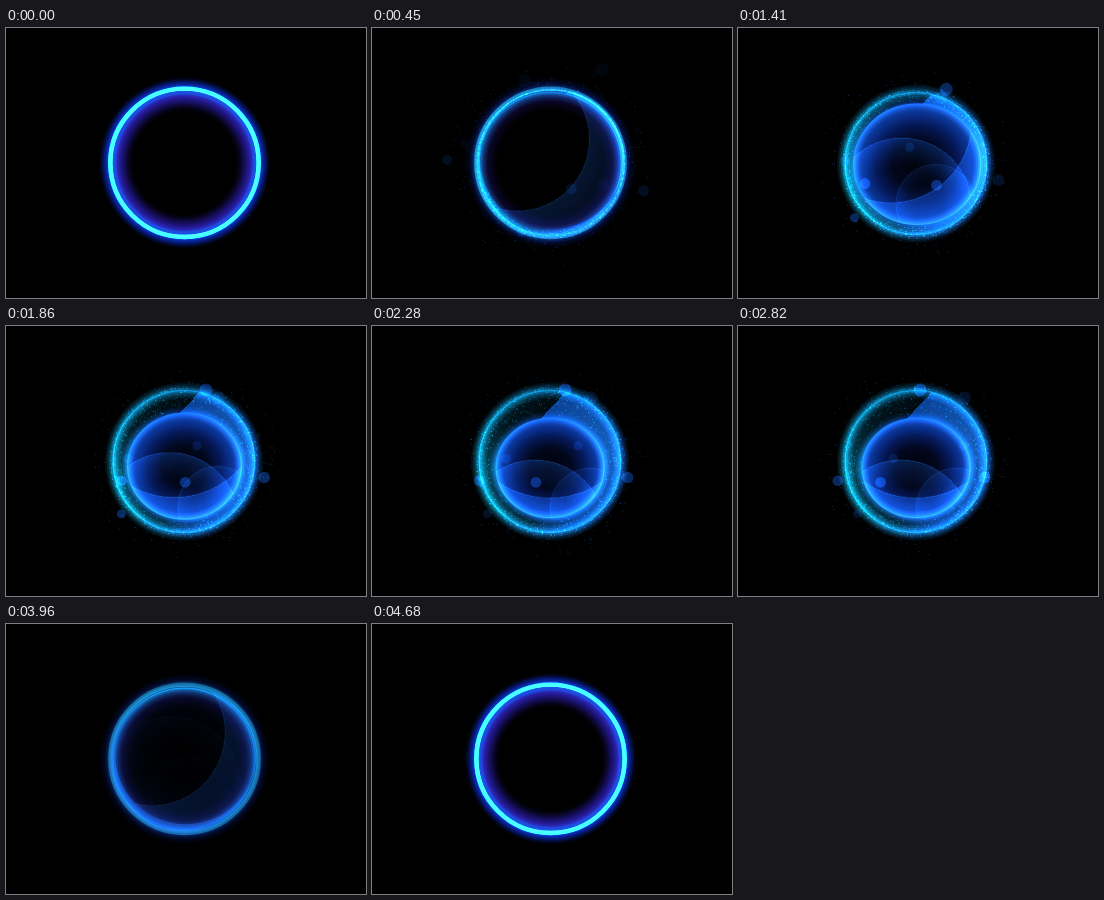
Recreate the animation shown at these times as an HTML page with a canvas. Size 360 by 270 pixels, loop 4.71 s.

```html
<!DOCTYPE html>
<html lang="en">
<head>
<meta charset="utf-8">
<title>Energy orb</title>
<style>
  html, body { margin: 0; width: 100%; height: 100%; overflow: hidden; background: #000; }
  canvas { display: block; width: 360px; height: 270px; }
</style>
</head>
<body>
<canvas id="stage" width="360" height="270"></canvas>
<script>
const ctx = document.getElementById('stage').getContext('2d');
const LOOP = 4.71, TAU = Math.PI * 2, DEG = TAU / 360;
const CX = 178, CY = 135.5, RIM = 71;

let seed = 11;
const random = () => (seed = seed * 16807 % 2147483647) / 2147483647;
const makeDots = count => Array.from({ length: count }, () =>
  ({ angle: random() * TAU, depth: random(), light: random(), phase: random() * TAU }));
const grains = makeDots(1300), dust = makeDots(500), discs = makeDots(8);

const mix = (a, b, u) => a + (b - a) * u;
const smooth = (a, b, t) => {
  const x = Math.min(1, Math.max(0, (t - a) / (b - a)));
  return x * x * (3 - 2 * x);
};
// Rises over [a, b] and falls over [c, d]
const pulse = (a, b, c, d, t) => smooth(a, b, t) * (1 - smooth(c, d, t));

function paint(gradient, ...stops) {
  stops.forEach(([at, color]) => gradient.addColorStop(at, color));
  return gradient;
}

function ellipse({ x, y, rx, ry }) {
  ctx.beginPath();
  ctx.ellipse(x, y, rx, ry, 0, 0, TAU);
}

// Soft line: the same outline stroked ever wider and fainter
function glow(shape, style, alpha, layers) {
  ellipse(shape);
  ctx.strokeStyle = style;
  for (let i = 0; i < layers; i++) {
    ctx.globalAlpha = alpha * .42 / (1 + i * .75);
    ctx.lineWidth = 1.5 + 3.6 * i;
    ctx.stroke();
  }
}

function drawNeon(alpha) {
  const x = 178.5, y = 134.8, outer = 87;
  ctx.globalAlpha = alpha;
  ctx.fillStyle = paint(ctx.createRadialGradient(x, y, 0, x, y, outer),
    [.575, '#0000'], [.655, '#0b0730'], [.736, '#22178a'], [.776, '#2a28b8'], [.787, '#1f45d8'],
    [.83, '#1c58e8'], [.88, '#0c38c8'], [.91, '#06208c'], [.943, '#030f48'], [1, '#0000']);
  ctx.fillRect(0, 0, 360, 270);
  ctx.strokeStyle = '#35eeff';
  ctx.lineWidth = 4.4;
  ctx.beginPath();
  ctx.arc(x, y, 74.2, 0, TAU);
  ctx.stroke();
}

// Area between rim and sphere: a blue crescent with a hard slanted edge, teal elsewhere
function drawBand(sphere, orb, turn) {
  const hub = turn + 190 * DEG;
  ctx.globalAlpha = orb * .8;
  ctx.fillStyle = paint(
    ctx.createConicGradient(turn - 47 * DEG, CX + 43 * Math.cos(hub), CY + 43 * Math.sin(hub)),
    [0, '#0c50b8'], [.13, '#1c78f0'], [.26, '#0c50b8'], [.33, '#02222e'],
    [.5, '#05546c'], [.7, '#04384c'], [.85, '#02222e'], [1, '#010c12']);
  ellipse(sphere);
  ctx.arc(CX, CY, RIM, 0, TAU);
  ctx.fill('evenodd');

  const rim = paint(ctx.createConicGradient(turn, CX, CY),
    [0, '#1c78ff'], [.25, '#1c90f8'], [.38, '#14c0f0'], [.55, '#10a8d8'], [.75, '#0c80c0'], [1, '#1c78ff']);
  glow({ x: CX, y: CY, rx: RIM, ry: RIM }, rim, orb, 5);
}

function drawSphere(sphere, orb, light) {
  const { x, y, rx, ry } = sphere;
  ctx.save();
  ctx.translate(x, y);
  ctx.scale(rx, ry);
  ctx.globalAlpha = orb * light * .9;
  ctx.fillStyle = paint(ctx.createRadialGradient(0, 0, 0, 0, 0, 1),
    [0, '#00020a'], [.4, '#020820'], [.65, '#061c64'], [.85, '#0c3cac'], [1, '#1a62e0']);
  ctx.beginPath();
  ctx.arc(0, 0, 1, 0, TAU);
  ctx.fill();
  ctx.restore();
  const edge = paint(ctx.createConicGradient(0, x, y),
    [0, '#2c98ff'], [.25, '#1c70f0'], [.5, '#1c80f8'], [.75, '#0c3cb0'], [1, '#2c98ff']);
  glow(sphere, edge, orb * light * .8, 4);
}

// Light that fades away from one side of a circular edge
function drawFold(x, y, r, inside, alpha) {
  const far = r + 40, edge = r / far, lit = '#1c68e8', clear = '#1450d000';
  ctx.globalAlpha = alpha;
  ctx.fillStyle = paint(ctx.createRadialGradient(x, y, 0, x, y, far), ...(inside
    ? [[edge * .6, clear], [edge, lit], [edge, clear]]
    : [[edge, clear], [edge, lit], [1, '#1450d080']]));
  ctx.fillRect(90, 50, 180, 175);
  ctx.strokeStyle = '#2c80f0';
  ctx.lineWidth = .7;
  ellipse({ x, y, rx: r, ry: r });
  ctx.stroke();
}

function drawFolds(sphere, alpha, shrink, light) {
  const { x, y } = sphere, a = (-90 - 60 * (1 - shrink)) * DEG, d = 40 + 22 * shrink;
  ctx.save();
  ellipse(sphere);
  ctx.clip();
  drawFold(x + d * Math.cos(a), y + d * Math.sin(a), 72 + 20 * shrink, false, alpha * .3);
  drawFold(x - 15, y + 28 + 34 * shrink, 70, true, alpha * light * .25);
  drawFold(x + 40 * shrink, y + 40, 40, true, alpha * light * .12);
  ctx.restore();
}

function drawDots(sphere, alpha, t, spread) {
  const { x, y, rx, ry } = sphere;
  const twinkle = dot => dot.light * (.55 + .45 * Math.sin(dot.phase + t * 5));
  ctx.fillStyle = '#1cb8e8';
  for (const dot of grains) {
    const a = dot.angle + t * .25, c = Math.cos(a), s = Math.sin(a), u = Math.sqrt(dot.depth);
    ctx.globalAlpha = alpha * twinkle(dot) * .6;
    ctx.fillRect(mix(x + rx * c, CX + 74 * c, u), mix(y + ry * s, CY + 74 * s, u), 1, 1);
  }
  ctx.fillStyle = '#1460c8';
  for (const dot of dust) {
    const a = dot.angle + t * .15, r = 74 + 22 * dot.depth ** 2 * spread;
    ctx.globalAlpha = alpha * twinkle(dot) * .6;
    ctx.fillRect(CX + r * Math.cos(a), CY + r * Math.sin(a), 1, 1);
  }
}

// Soft discs riding on a turning shell around the orb
function drawDiscs(alpha, t, spread) {
  const d = t - 2.1, spin = (27 - 26 * d - 6 * d ** 3) * DEG;
  ctx.fillStyle = '#1050c0';
  discs.forEach((disc, i) => {
    const a = i * 137.5 * DEG + spin, tilt = (disc.depth * 2 - 1) * 1.1, r = 82 * spread;
    ctx.globalAlpha = alpha * (Math.cos(a) > 0 ? .5 : .2);
    ctx.beginPath();
    ctx.arc(CX + r * Math.cos(tilt) * Math.sin(a), CY + r * Math.sin(tilt), 4 + 2.5 * disc.light, 0, TAU);
    ctx.fill();
  });
}

function draw() {
  const t = performance.now() / 1000 % LOOP;
  const neon = 1 - pulse(0, .75, 3.6, 4.65, t);
  const orb = pulse(0, .7, 3.55, 4.4, t);
  const loose = pulse(.05, .5, 3.3, 3.85, t);
  const shrink = pulse(.6, 2.3, 2.8, 4.2, t);
  const light = pulse(.8, 1.5, 3.4, 4.2, t);
  const spread = mix(.9, 1.32, smooth(0, .5, t)) - .32 * smooth(.7, 1.6, t);
  const turn = 100 * DEG * smooth(2.8, 3.6, t);
  const sphere = { x: 180 - 2 * shrink, y: 131 + 11 * shrink, rx: 72 - 18 * shrink, ry: 70 - 20 * shrink };

  ctx.globalCompositeOperation = 'source-over';
  ctx.globalAlpha = 1;
  ctx.fillStyle = '#000';
  ctx.fillRect(0, 0, 360, 270);
  ctx.globalCompositeOperation = 'lighter';
  if (neon > 0) drawNeon(neon);
  if (orb > 0) {
    drawBand(sphere, orb, turn);
    drawSphere(sphere, orb, light);
    drawFolds(sphere, orb, shrink, light);
    drawDots(sphere, loose, t, spread);
    drawDiscs(loose * mix(.35, 1, light), t, spread);
  }
  requestAnimationFrame(draw);
}
draw();
</script>
</body>
</html>
```
